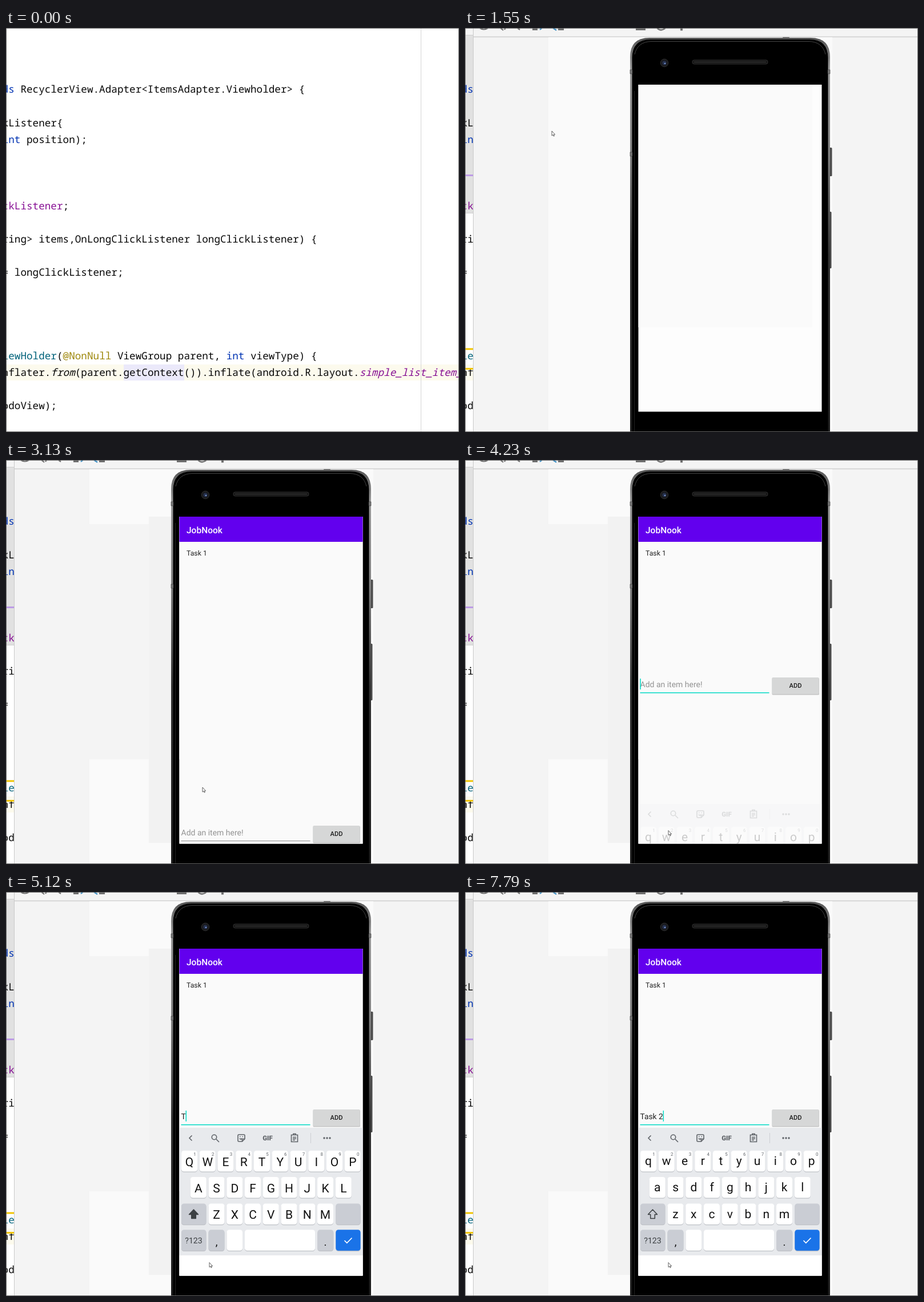
An HTML page that plays this animation: 793 by 706 pixels, repeating every 8000 ms.

```html
<!DOCTYPE html>
<html lang="en">
<head>
<meta charset="utf-8">
<title>Task list demo</title>
<style>
html, body { margin: 0; width: 100%; height: 100%; overflow: hidden; background: #fff; }
svg { display: block; width: 793px; height: 706px; }
text { white-space: pre; text-rendering: geometricPrecision; font-family: Roboto, sans-serif; }
.code text { font: 17.67px "Noto Sans Mono", monospace; fill: #080808; }
.mid { text-anchor: middle; }
.line { fill: none; stroke: #5f6368; stroke-width: 1.6; }
</style>
</head>
<body>
<svg id="stage" viewBox="0 0 793 706">
  <defs>
    <clipPath id="screenClip"><rect x="303.5" y="99" width="321" height="571.5"/></clipPath>
    <linearGradient id="metal" x2="0" y2="1">
      <stop offset="0" stop-color="#555"/><stop offset=".08" stop-color="#999"/>
      <stop offset=".3" stop-color="#808080"/><stop offset=".55" stop-color="#333"/>
      <stop offset="1" stop-color="#1c1c1c"/>
    </linearGradient>
  </defs>
  <rect width="793" height="706" fill="#fff"/>

  <g class="code">
    <rect y="588" width="793" height="28" fill="#fcfaed"/>
    <rect x="206" y="588" width="106" height="28" fill="#ebe9fa"/>
    <rect x="726" width="1" height="706" fill="#d6d6d6"/>
    <rect id="scroll" x="1" y="12" width="13" height="311" fill="#e1e1e1"/>
    <g id="code"></g>
    <rect id="beam" x="206" y="590" width="2" height="24"/>
  </g>

  <g id="panel">
    <rect width="793" height="12" fill="#f4f4f4"/>
    <path d="M0 12.5H14M0 323.5H14" stroke="#cfcfcf"/>
    <path d="M0 257.5H14" stroke="#bd9be6" stroke-width="3"/>
    <path d="M0 561H14M0 595.5H14" stroke="#f0c400" stroke-width="3"/>
    <rect x="14" width="779" height="706" fill="#f4f4f4"/>
    <path d="M14.5 0V706" stroke="#c9c9c9"/>
    <path d="M15 15.5H793" stroke="#cdcdcd" stroke-width="1.4"/>
    <g fill="none" stroke="#6e6e6e" stroke-width="2.2">
      <path d="M26 0q7 5 14 0M336 0q7 7 15 0M62 0l5 4M71 0l-2 3M92 0l4 3M201 0h4"/>
      <path d="M118 2h9M163 2h10M299 2h17M377 2.5h4" stroke-width="4"/>
      <path d="M131 3l5-4M154 0l6 4" stroke="#3e8fc4"/>
    </g>
  </g>

  <g id="phone">
    <rect x="146" y="16" width="497" height="690" fill="#fafafa"/>
    <rect id="dull" x="135" y="112" width="473" height="411" fill="#f4f4f4"/>
    <rect id="strip" x="250" y="99" width="50" height="570" fill="#f2f2f2"/>
    <rect x="556" y="16" width="12" height="4" rx="1" fill="#777"/>
    <rect x="637" y="209" width="5.5" height="50" rx="1.5" fill="#4c4c4c"/>
    <rect x="637" y="321" width="4.5" height="99" rx="1.5" fill="#4c4c4c"/>
    <path d="M289 706V51Q289 17 323 17H605Q639 17 639 51V706Z" fill="url(#metal)"/>
    <path d="M292.5 706V52Q293 20 325 20H603Q635 20 635.5 52V706Z"/>
    <path d="M297 46Q302 24 326 23.500H602Q626 24 631 46" fill="none" stroke="#555" stroke-width=".8"/>
    <path d="M296.500 110V706" stroke="#222"/>
    <path d="M289 73h4v7h-4zM289 217h4v7h-4zM635 73h4v7h-4z" fill="#777" stroke="#333" stroke-width=".6"/>
    <circle cx="349" cy="61" r="6.800" fill="#191a1d" stroke="#303030"/>
    <circle cx="349" cy="61" r="3.500" fill="#26314e"/>
    <circle cx="350" cy="62" r="1.300" fill="#7794cb"/>
    <rect x="398" y="56" width="132" height="7" rx="3" fill="#161616" stroke="#303030"/>
    <path d="M401 59.500H527" stroke="#3a3a3a"/>
    <g clip-path="url(#screenClip)">
      <rect x="303" y="99" width="322" height="572" fill="#fdfdfd"/>
      <rect x="303" y="99" width="305" height="424" fill="#fafafa"/>
      <g id="app">
        <rect x="303" y="99" width="322" height="572" fill="#fafafa"/>
        <rect x="303" y="99" width="322" height="44" fill="#6200ee"/>
        <text x="316" y="127.500" font-size="15.500" font-weight="500" fill="#fff">JobNook</text>
        <text x="316" y="166.700" font-size="12.300" fill="#212121">Task 1</text>
        <g id="form">
          <text id="hint" x="306.500" y="397" font-size="14" fill="#939393">Add an item here!</text>
          <text id="typed" x="306.500" y="397" font-size="13.800" fill="#212121"></text>
          <path id="mark" stroke="#222"/>
          <path id="rule" d="M306.500 406.700H532.500"/>
          <rect id="caret" y="382" width="1.500" height="19" fill="#03dac5"/>
          <rect x="537.500" y="381" width="82.500" height="29.500" rx="1.500" fill="#c4c4c4"/>
          <rect x="537.500" y="380" width="82" height="29" rx="1.500" fill="#d6d7d7"/>
          <text class="mid" x="578.500" y="398.300" font-size="11.200" font-weight="500" fill="#1c1c1c">ADD</text>
        </g>
        <g id="keys">
          <rect x="303" y="412" width="322" height="223" fill="#e8eaed"/>
          <rect x="303" y="635" width="322" height="100" fill="#fff"/>
          <g id="tools" class="line">
            <path d="M325.500 425.500l-4.500 4.500 4.500 4.500M368 432l5 5"/>
            <circle cx="364.500" cy="428.500" r="4.200"/>
            <path d="M407.500 424h9q1.500 0 1.500 1.500v6l-4.500 4.500h-6q-1.500 0-1.500-1.500v-9q0-1.500 1.500-1.500zM418 431.500h-4.500v4.500M409 430.500q2 3 4 0"/>
            <path d="M409 427.500h1.500M413.500 427.500h1.500" stroke-width="1.500"/>
            <path d="M499.500 424.500h11v12h-11zM503 424v-1.500h4v1.500M502 428.500h6M502 431h6M502 433.500h4"/>
            <path d="M533.500 421V439" stroke="#cdcfd3" stroke-width="1"/>
            <g fill="#5f6368" stroke="none">
              <circle cx="557" cy="430" r="1.700"/><circle cx="562" cy="430" r="1.700"/><circle cx="567" cy="430" r="1.700"/>
              <text class="mid" x="458" y="434.200" font-size="11.500" font-weight="900">GIF</text>
            </g>
          </g>
          <g id="words">
            <path class="line" d="M320.500 425.500l4.500 4.500-4.500 4.500"/>
            <path d="M416.500 420V440M510.500 420V440" stroke="#c6c9cd"/>
          </g>
          <g id="pads"></g>
          <path id="shift" d="M328.500 555l8 8.500h-4.200v7h-7.600v-7h-4.200z" stroke="#3c4043" stroke-width="1.500" stroke-linejoin="round"/>
          <path d="M592.500 609l4.300 4.300 8.700-8.800" fill="none" stroke="#fff" stroke-width="1.700"/>
        </g>
      </g>
    </g>
  </g>

  <path id="mouse" d="M0 0v8.200l1.900-1.700 1.300 2.700 1.200-.6-1.200-2.500h2.400z" fill="#fff" stroke="#3a3a3a" stroke-width=".8"/>
  <rect x=".5" y=".5" width="792" height="705" fill="none" stroke="#636363"/>
</svg>

<script>
const $ = id => document.getElementById(id);
const LOOP = 8000;

function add(parent, tag, attrs, text) {
  const el = document.createElementNS("http://www.w3.org/2000/svg", tag);
  for (const k in attrs) el.setAttribute(k, attrs[k]);
  if (text !== undefined) el.textContent = text;
  parent.appendChild(el);
  return el;
}

// Code: each row is a list of [text, colour, style]
const BLUE = "#0033b3", PURPLE = "#871094";
const rows = {
  0: [["ds", BLUE], [" RecyclerView.Adapter<ItemsAdapter.Viewholder> {"]],
  2: [["kListener{"]],
  3: [["int", BLUE], [" position);"]],
  7: [["ckListener", PURPLE], [";"]],
  9: [["ring> items,OnLongClickListener longClickListener) {"]],
  11: [["= longClickListener;"]],
  16: [["iewHolder", "#00627a"], ["("], ["@NonNull", "#9e880d"], [" ViewGroup parent, "], ["int", BLUE], [" viewType) {"]],
  17: [["nflater."], ["from", "#080808", "italic"], ["(parent.getContext()).inflate(android.R.layout."], ["simple_list_item_1", PURPLE, "italic"]],
  19: [["odoView);"]]
};
for (const r in rows) {
  const line = add($("code"), "text", { x: -6.4, y: 113.3 + r * 29.1 });
  for (const [s, fill = "#080808", style = "normal"] of rows[r])
    add(line, "tspan", { fill, "font-style": style }, s);
}

// Keyboard
const letters = [];
function pad(x, y, w, fill = "#fff") {
  add($("pads"), "rect", { x, y: y + 1.2, width: w, height: 36.5, rx: 4.5, fill: "#bfc2c7" });
  add($("pads"), "rect", { x, y, width: w, height: 36.5, rx: 4.5, fill });
}
function label(x, y, size, s, fill = "#111") {
  return add($("pads"), "text", { class: "mid", x, y, "font-size": size, fill }, s);
}
[["qwertyuiop", 321, 452], ["asdfghjkl", 336.8, 498], ["zxcvbnm", 368.5, 544.5]].forEach(([set, x0, y], row) => {
  [...set].forEach((ch, i) => {
    const x = x0 + i * 31.75;
    pad(x - 14, y, 28);
    letters.push({ el: label(x, y + 25, 21, ch), ch, y });
    if (!row) label(x + 9.5, y + 9.2, 8, (i + 1) % 10, "#5f6368");
  });
});
const GREY = "#cacdd4";
pad(307, 544.5, 43.5, GREY);
pad(577.3, 544.5, 43.3, GREY);
pad(307, 590.3, 43.5, GREY);
pad(354.5, 590.3, 28, GREY);
pad(386.5, 590.3, 27.5);
pad(418, 590.3, 123);
pad(545.3, 590.3, 28, GREY);
pad(577.3, 590.3, 43.3, "#1a73e8");
label(328.5, 613.7, 14.2, "?123", "#3c4043");
label(368.5, 617.5, 19, ",");
label(559, 617.5, 19, ".");

const guesses = [374, 463, 551.5].map(x =>
  add($("words"), "text", { class: "mid", x, y: 435, "font-size": 14.2, fill: "#44484c" }));
const bars = [null, ["T", "The", "Today"], ["Ta", "Take", "Talk"], ["Take", "Task", "Tasks"]];

// Timed states, each held until the next
const mouse = [
  [1310, 210, 172], [1430, 154, 167], [1550, 152, 180], [1750, 137, 236], [1890, 109, 250],
  [2010, 185, 290], [2140, 285, 320], [2400, 288, 425], [2520, 292, 509.5], [2640, 315, 530],
  [2880, 341, 549], [3130, 344, 572], [3250, 349, 600], [3370, 353, 628], [3490, 356, 647.5]
];
// time, text, underlined letters, suggestion bar
const typing = [
  [0, "", 0, 0], [5120, "T", 0, 0], [5240, "T", 1, 0], [5360, "T", 1, 1], [5830, "Ta", 1, 1],
  [5950, "Ta", 2, 2], [6350, "Tas", 2, 2], [6470, "Task", 3, 2], [6650, "Task", 4, 2],
  [6780, "Task", 4, 3], [7280, "Task ", 4, 3], [7400, "Task ", 0, 3], [7670, "Task 2", 0, 3],
  [7790, "Task 2", 0, 0]
];
// time, offset, opacity
const rise = [[4230, 189, .2], [4370, 95, .6], [4490, 28, .9], [4610, 0, 1]];

const at = (list, t) => list.filter(s => s[0] <= t).pop();
const show = (id, on) => { $(id).style.display = on ? "" : "none"; };

function draw(t) {
  show("beam", t >= 150 && t < 950);
  show("scroll", t >= 950);
  show("panel", t >= 950);
  show("phone", t >= 1550);
  show("dull", t >= 1750);
  show("strip", t >= 2640);
  show("app", t >= 2640);

  const m = at(mouse, t);
  show("mouse", m);
  if (m) $("mouse").setAttribute("transform", `translate(${m[1]} ${m[2]})`);

  const k = at(rise, t);
  show("keys", k);
  if (k) {
    $("keys").setAttribute("transform", `translate(0 ${k[1]})`);
    $("keys").setAttribute("opacity", k[2]);
  }

  const focus = t >= 3860;
  $("form").setAttribute("transform", `translate(0 ${t < 4110 ? 259 : 0})`);
  $("rule").setAttribute("stroke", focus ? "#03dac5" : "#858585");
  $("rule").setAttribute("stroke-width", focus ? 1.6 : 1);

  const [, text, under, bar] = at(typing, t);
  const typed = $("typed");
  typed.textContent = text;
  show("hint", !text);
  show("caret", focus);
  $("caret").setAttribute("x", 306.3 + (text && t >= 2640 ? typed.getComputedTextLength() : 0));
  show("mark", under);
  if (under) $("mark").setAttribute("d", `M306.5 399.5h${typed.getSubStringLength(0, under)}`);

  show("tools", !bar);
  show("words", bar);
  if (bar) guesses.forEach((g, i) => { g.textContent = bars[bar][i]; });

  const caps = t >= 4370 && t < 5240;
  for (const { el, ch, y } of letters) {
    el.textContent = caps ? ch.toUpperCase() : ch;
    el.setAttribute("y", y + (caps ? 26.5 : 25));
  }
  $("shift").setAttribute("fill", caps ? "#3c4043" : "none");
}

const start = performance.now();
function tick() {
  draw((performance.now() - start) % LOOP);
  requestAnimationFrame(tick);
}
tick();
</script>
</body>
</html>
```
